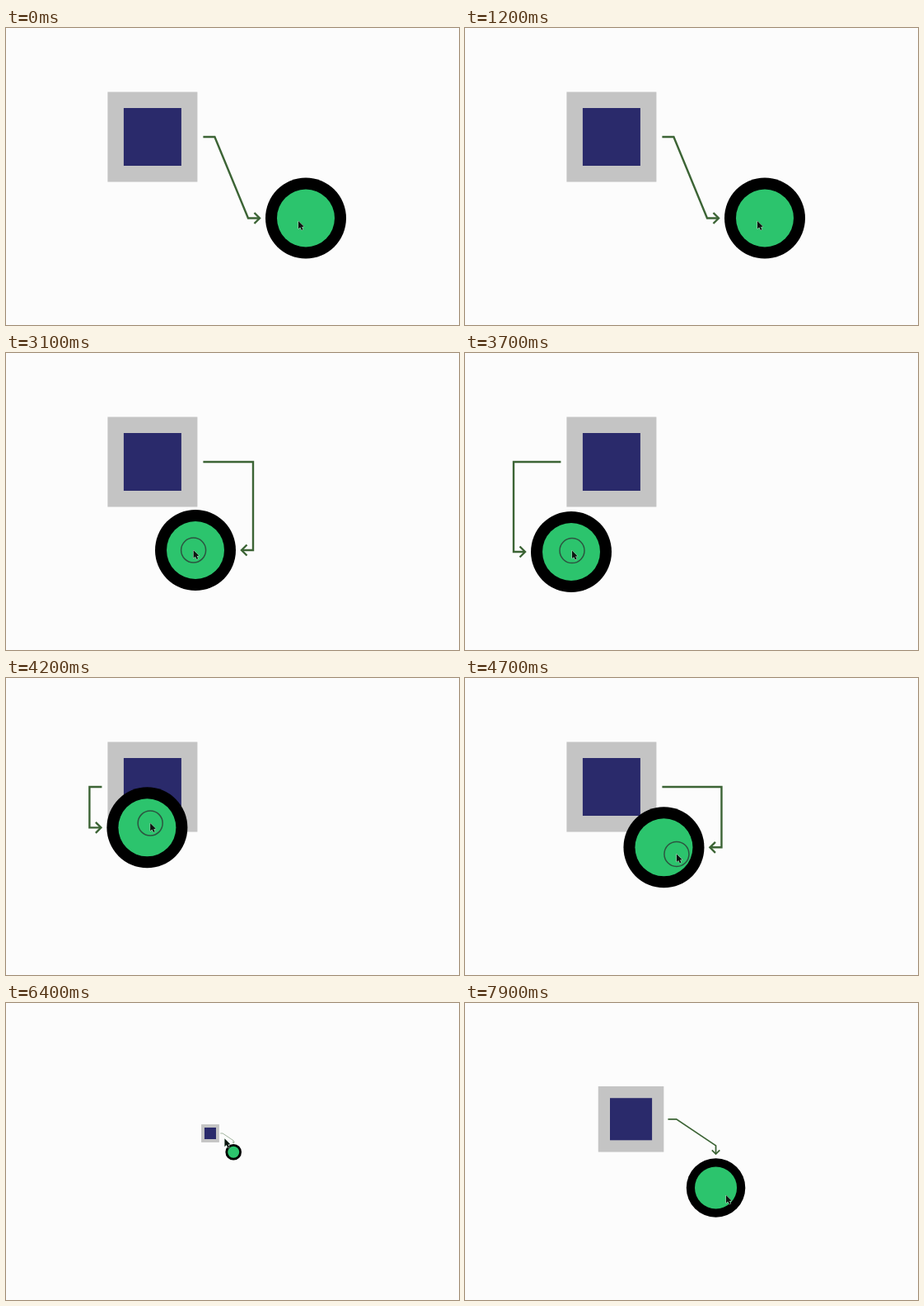
These frames come from a looping animation (550x360 px, 8000 ms). An HTML page with a canvas:

```html
<!DOCTYPE html>
<html lang="en">
<head>
<meta charset="utf-8">
<title>Connected shapes</title>
<style>
  html, body { margin: 0; width: 100%; height: 100%; overflow: hidden; background: #fcfcfc; }
  canvas { display: block; }
</style>
</head>
<body>
<canvas id="stage" width="550" height="360"></canvas>
<script>
const ctx = document.getElementById('stage').getContext('2d');
const LOOP = 8000, STEP = 100;
const HIDE = 1600, GRAB = 2400, RELEASE = 5100, LAG = 55;
const GAP = 7, STUB = 14, RADIUS = 49, REACH = RADIUS + GAP;
const FOCUS = { x: 265.5, y: 164.5 };
const BOX = { x: 177.9, y: 132, half: 54.5 };
const HOME = { x: 364, y: 230.5 }, DROP = { x: 319, y: 246 };

const move = (from, to, target) => ({ from, to, target });

// The disc is dragged in four strokes around the box
const drag = [
  move(2450, 3100, { x: 230, y: 239 }),
  move(3100, 3700, { x: 129, y: 241 }),
  move(3700, 4350, { x: 178, y: 172 }),
  move(4350, RELEASE, DROP)
];
const travel = [
  move(RELEASE, 5700, FOCUS),
  move(7450, 7850, { x: 317, y: 233 })
];
const zooming = [
  move(5700, 6400, { log: Math.log(0.2) }),
  move(6400, 6600, { log: Math.log(0.455) }),
  move(6700, 7400, { log: Math.log(0.73) })
];

function ease(t, from, to) {
  const u = Math.min(1, Math.max(0, (t - from) / (to - from)));
  return u * u * (3 - 2 * u);
}

// Runs eased moves one after another
function follow(start, moves, t) {
  const state = { ...start };
  for (const { from, to, target } of moves) {
    const s = ease(t, from, to);
    for (const key in target) state[key] += (target[key] - state[key]) * s;
  }
  return state;
}

const discAt = t => follow(HOME, drag, t);

function pointerAt(t) {
  if (t < HIDE) return { x: 355, y: 234 };
  return t < RELEASE ? discAt(t + LAG) : follow(DROP, travel, t);
}

function disc({ x, y }, r, color) {
  ctx.fillStyle = color;
  ctx.beginPath();
  ctx.arc(x, y, r, 0, Math.PI * 2);
  ctx.fill();
}

function square({ x, y }, half, color) {
  ctx.fillStyle = color;
  ctx.fillRect(x - half, y - half, half * 2, half * 2);
}

function polyline(points) {
  ctx.beginPath();
  points.forEach(([x, y]) => ctx.lineTo(x, y));
}

// Chooses the sides the connector leaves and enters by
function route({ x, y }) {
  const side = x < BOX.x ? -1 : 1;
  const exit = BOX.x + side * (BOX.half + GAP);
  const knee = exit + side * STUB;
  const start = [exit, BOX.y];
  if (x - REACH - STUB > knee)
    return [start, [knee, BOX.y], [x - REACH - STUB, y], [x - REACH, y]];
  if (side > 0 && x > knee)
    return [start, [knee, BOX.y], [x, y - REACH - STUB], [x, y - REACH]];
  const entry = x + side * REACH;
  const bend = side * Math.max(side * exit, side * entry) + side * STUB;
  return [start, [bend, BOX.y], [bend, y], [entry, y]];
}

function drawArrow(points) {
  const [[px, py], [x, y]] = points.slice(-2);
  ctx.strokeStyle = '#3c6435';
  ctx.lineWidth = 2.4;
  polyline(points);
  ctx.stroke();
  ctx.save();
  ctx.translate(x, y);
  ctx.rotate(Math.atan2(y - py, x - px));
  polyline([[-6.5, -6.5], [0, 0], [-6.5, 6.5]]);
  ctx.stroke();
  ctx.restore();
}

function drawScene(center) {
  square(BOX, BOX.half, '#c4c4c4');
  square(BOX, 35, '#2a2a6b');
  drawArrow(route(center));
  disc(center, RADIUS, '#000');
  disc(center, 35, '#2cc46d');
}

function drawPointer({ x, y }, pressed) {
  ctx.save();
  ctx.translate(x, y);
  if (pressed) {
    ctx.strokeStyle = '#2c5540';
    ctx.lineWidth = 1.5;
    ctx.beginPath();
    ctx.arc(0, 0, 15, 0, Math.PI * 2);
    ctx.stroke();
  }
  polyline([[0, 0], [0, 9.5], [2.2, 7.6], [3.9, 11], [5.6, 10.2], [4.1, 7], [6.8, 6.8]]);
  ctx.closePath();
  ctx.strokeStyle = '#c4dccd';
  ctx.lineWidth = 1;
  ctx.stroke();
  ctx.fillStyle = '#0c1610';
  ctx.fill();
  ctx.restore();
}

function draw(t) {
  ctx.fillStyle = '#fcfcfc';
  ctx.fillRect(0, 0, 550, 360);
  const zoom = Math.exp(follow({ log: 0 }, zooming, t).log);
  ctx.save();
  ctx.translate(FOCUS.x, FOCUS.y);
  ctx.scale(zoom, zoom);
  ctx.translate(-FOCUS.x, -FOCUS.y);
  drawScene(discAt(t));
  ctx.restore();
  if (t < HIDE || t >= GRAB) drawPointer(pointerAt(t), t >= GRAB && t < RELEASE);
}

function tick() {
  const t = performance.now() % LOOP;
  draw(Math.floor(t / STEP) * STEP);
  requestAnimationFrame(tick);
}
tick();
</script>
</body>
</html>
```
